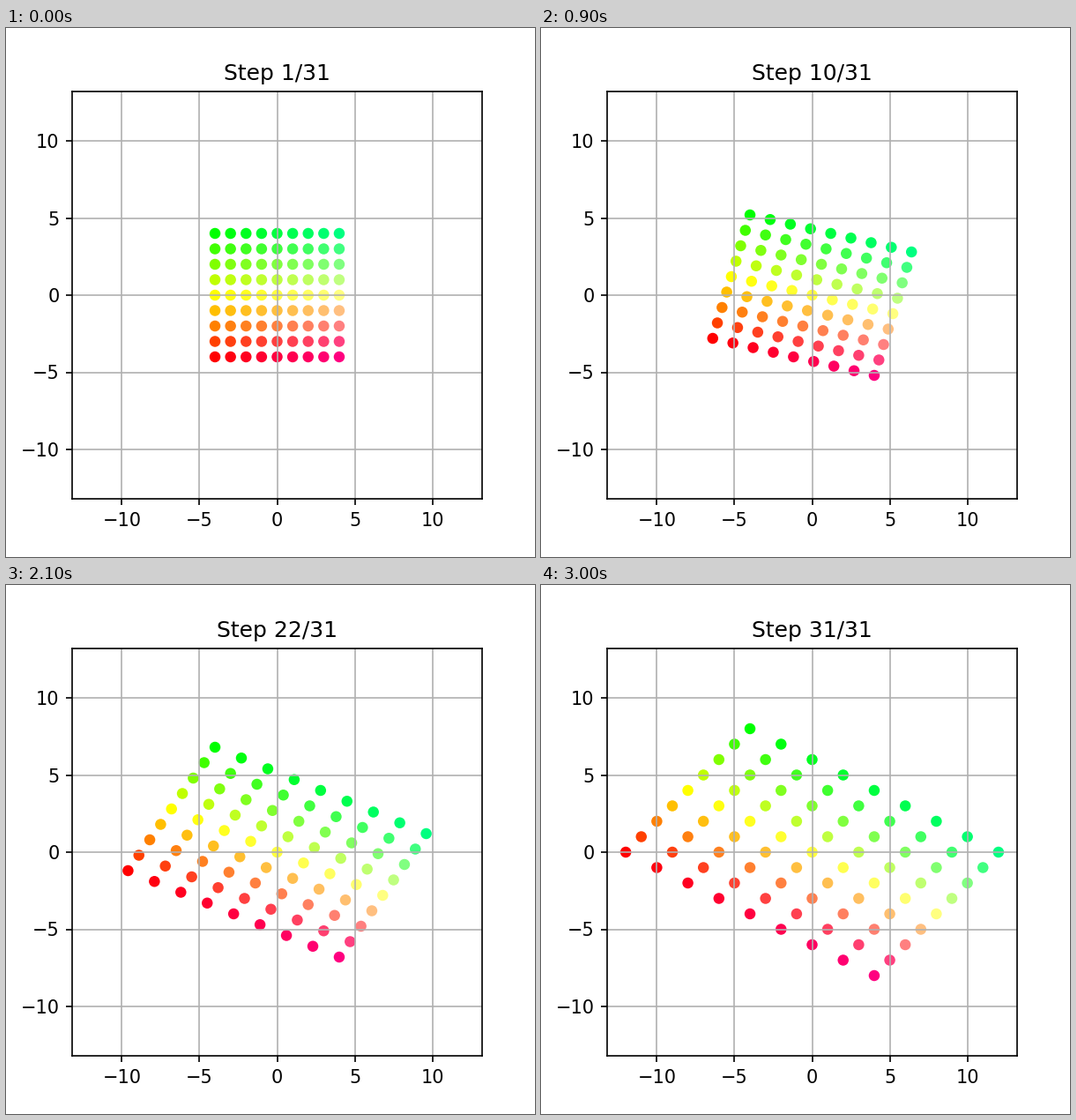
Write a matplotlib script that moves like this. It is 600x600 px and loops after 3.1 s.

```python
import numpy as np
import matplotlib.pyplot as plt
from matplotlib.animation import FuncAnimation

STEPS = 31
INTERVAL = 100  # ms
HALF = 4
LIMIT = 13.2
MATRIX = np.array([[2, 1], [-1, 1]])


def color_of(x, y):
    """Hue follows y, a touch of blue follows x."""
    return min(1, 1 - y / HALF), min(1, 1 + y / HALF), 1 / 4 + x / 16


def transform(t):
    """Blend linearly from the identity to the full matrix."""
    return (1 - t) * np.eye(2) + t * MATRIX


axis = np.arange(-HALF, HALF + 1)
points = np.array([(x, y) for x in axis for y in axis], dtype=float)

fig, ax = plt.subplots(figsize=(4, 4), dpi=150)
dots = ax.scatter(points[:, 0], points[:, 1], s=36,
                  c=[color_of(x, y) for x, y in points], edgecolors="none")
ax.set_xlim(-LIMIT, LIMIT)
ax.set_ylim(-LIMIT, LIMIT)
ax.grid(True)
title = ax.set_title("")


def update(step):
    dots.set_offsets(points @ transform(step / (STEPS - 1)).T)
    title.set_text(f"Step {step + 1}/{STEPS}")
    return dots, title


anim = FuncAnimation(fig, update, frames=STEPS, interval=INTERVAL,
                     repeat=True, repeat_delay=0)
plt.show()
```
